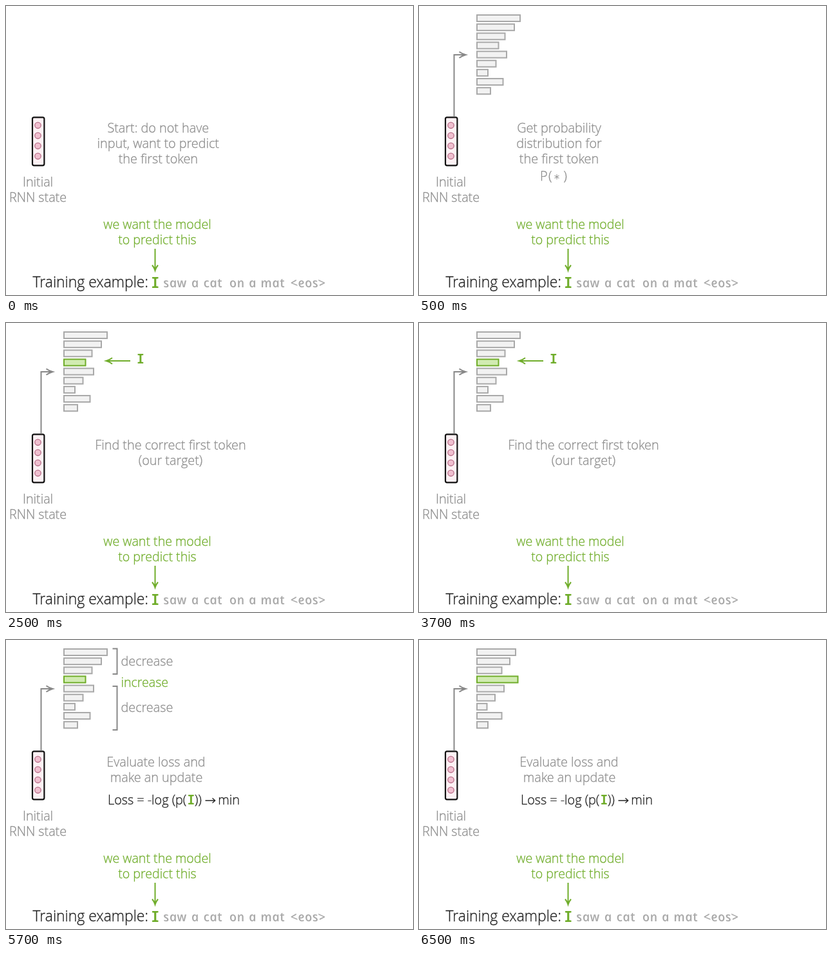
An HTML page for the animation above (8000 ms loop, 632 by 450 pixels).

```html
<!DOCTYPE html>
<html lang="en">
<head>
<meta charset="utf-8">
<title>RNN training step</title>
<style>
  html, body { margin: 0; width: 100%; height: 100%; overflow: hidden; background: #fff; }
  svg { display: block; width: 632px; height: 450px; }
  text {
    font: 300 19.8px "Open Sans", "Noto Sans", sans-serif; white-space: pre;
    color: #8c8c8c; fill: currentColor; stroke: currentColor; stroke-width: .3px;
  }
  .mid { text-anchor: middle; }
  .dark { color: #222; }
  .green { color: #70ad2b; font-size: 19.6px; }
  .title { font-size: 22.9px; }
  .star { font: 17px "DejaVu Sans", sans-serif; stroke: none; }
  .token { font: 600 22.5px "Noto Sans Mono", "DejaVu Sans Mono", monospace; color: #70ad2b; stroke: none; text-anchor: middle; }
  .token.small { font-size: 20.5px; }
  .words { font: italic 600 19.6px "Open Sans", sans-serif; letter-spacing: .6px; color: #aaa; stroke: none; }
  .line { fill: none; stroke: #888; stroke-width: 2; }
  .line.go { stroke: #70ad2b; }
  .line.thin { stroke: #222; stroke-width: 1.3; }
  .bars rect { x: 90px; height: 10px; fill: #f2f2f2; stroke: #a9a9a9; stroke-width: 2; }

  /* every change is a hard cut */
  .step, .bars rect { animation: 8s step-end infinite; }
  .start { animation-name: start; }
  .dist { animation-name: dist; }
  .find { animation-name: find; }
  .loss { animation-name: loss; }
  .hint { animation-name: hint; }
  .chart { animation-name: chart; }
  .bars rect { animation-name: update; }
  .bars .hit { animation-name: update, mark; }
  @keyframes start { 0% { visibility: visible } 6.25%, 100% { visibility: hidden } }
  @keyframes chart { 0% { visibility: hidden } 6.25%, 100% { visibility: visible } }
  @keyframes dist { 0% { visibility: hidden } 6.25% { visibility: visible } 31.25%, 100% { visibility: hidden } }
  @keyframes find { 0% { visibility: hidden } 31.25% { visibility: visible } 56.25%, 100% { visibility: hidden } }
  @keyframes loss { 0% { visibility: hidden } 56.25%, 100% { visibility: visible } }
  @keyframes hint { 0% { visibility: hidden } 56.25% { visibility: visible } 81.25%, 100% { visibility: hidden } }
  @keyframes update { 0% { width: var(--a) } 81.25%, 100% { width: var(--b) } }
  @keyframes mark {
    0% { fill: #f2f2f2; stroke: #a9a9a9 }
    31.25%, 100% { fill: #d1ebb2; stroke: #70ad2b }
  }
</style>
</head>
<body>
<svg viewBox="0 0 632 450">
  <!-- RNN state -->
  <rect x="41" y="173.3" width="18.4" height="75" rx="2.5" fill="#fdf1f4" stroke="#111" stroke-width="2.2"/>
  <g fill="#f0c0d0" stroke="#b9708a" stroke-width="1.3">
    <circle cx="49.5" cy="185.8" r="4.7"/>
    <circle cx="49.5" cy="201.8" r="4.7"/>
    <circle cx="49.5" cy="217.8" r="4.7"/>
    <circle cx="49.5" cy="233.8" r="4.7"/>
  </g>
  <g class="mid">
    <text x="49.5" y="281">Initial</text>
    <text x="49.5" y="305">RNN state</text>
  </g>

  <!-- training example -->
  <g class="mid">
    <text class="green" x="235" y="347">we want the model</text>
    <text class="green" x="235" y="371.3">to predict this</text>
  </g>
  <path class="line go" d="M231.5 378V411M227 403.5Q230 407 231.5 412Q233 407 236 403.5"/>
  <text class="dark title" x="41.5" y="438">Training example:</text>
  <text class="token" x="231.8" y="438.5">I</text>
  <text class="words" transform="translate(0 438) skewX(12)"><tspan x="245.5">saw</tspan><tspan x="289">a</tspan><tspan x="307.8">cat</tspan><tspan x="348">on</tspan><tspan x="378.2">a</tspan><tspan x="396.5">mat</tspan><tspan x="443">&lt;eos&gt;</tspan></text>

  <!-- probability chart -->
  <g class="step chart">
    <path class="line" d="M54.5 172.5V76H72M62.5 71.2Q67 74.5 72.5 76Q67 77.5 62.5 80.8"/>
    <g class="bars" id="bars"></g>
  </g>

  <!-- captions -->
  <g class="step start mid">
    <text x="236.3" y="196.5">Start: do not have</text>
    <text x="236.3" y="220.7">input, want to predict</text>
    <text x="236.3" y="244.9">the first token</text>
  </g>

  <g class="step dist">
    <g class="mid">
      <text x="217.5" y="196.8">Get probability</text>
      <text x="217.5" y="221">distribution for</text>
      <text x="217.5" y="245.2">the first token</text>
      <text class="star" x="214" y="274.5">*</text>
    </g>
    <text y="272"><tspan x="188">P</tspan><tspan x="201">(</tspan><tspan x="224.5">)</tspan></text>
  </g>

  <g class="step find">
    <path class="line go" d="M193 59H156M165 54.3Q161 57.5 155.5 59Q161 60.5 165 63.7"/>
    <text class="token small" x="209" y="63">I</text>
    <g class="mid">
      <text x="255.5" y="196.5">Find the correct first token</text>
      <text x="255.5" y="220.7">(our target)</text>
    </g>
  </g>

  <g class="step hint">
    <path class="line" d="M165.5 13.5H172.5V53H165.5M165.5 72H172.5V140H165.5"/>
    <text x="178.5" y="40">decrease</text>
    <text class="green" x="178.5" y="73">increase</text>
    <text x="178.5" y="112">decrease</text>
  </g>

  <g class="step loss">
    <g class="mid">
      <text x="233" y="196.5">Evaluate loss and</text>
      <text x="233.5" y="220.7">make an update</text>
    </g>
    <text class="dark" x="158" y="256">Loss = -log (p(</text>
    <text class="token small" x="287.3" y="256">I</text>
    <text class="dark" x="293" y="256">))</text>
    <path class="line thin" d="M309.5 250H324.5M320.5 246.2L324.7 250L320.5 253.8"/>
    <text class="dark" x="329.3" y="256">min</text>
  </g>
</svg>
<script>
  const before = [67, 58, 43.5, 33.5, 46, 29.5, 17, 40.5, 21];
  const after = [60, 51, 38.5, 63.5, 42, 28, 15.5, 38.5, 17];
  document.getElementById('bars').innerHTML = before.map((w, i) =>
    `<rect y="${14 + 14.15 * i}" class="${i === 3 ? 'hit' : ''}" style="--a:${w}px;--b:${after[i]}px"/>`
  ).join('');
</script>
</body>
</html>
```
